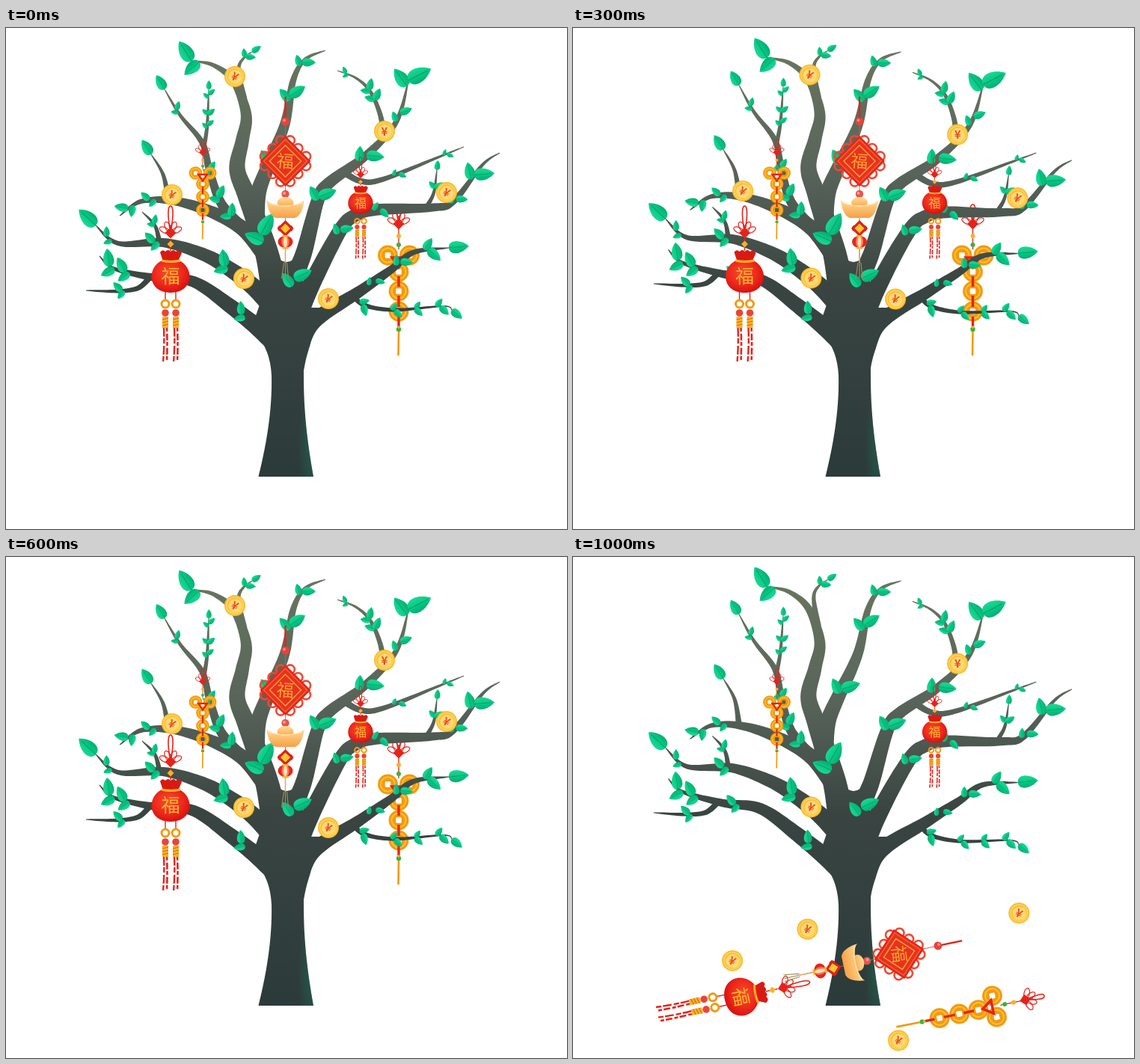
An HTML page that plays this animation: 750x670 px, repeating every 1100 ms.

```html
<!DOCTYPE html>
<html lang="zh">
<head>
<meta charset="utf-8">
<title>Lucky tree</title>
<style>
  html, body { margin: 0; width: 100%; height: 100%; overflow: hidden; background: #fff; }
  svg { display: block; width: 750px; height: 670px; }
  text { font-family: "Noto Sans CJK SC", "Noto Sans CJK", sans-serif; text-anchor: middle; }
</style>
</head>
<body>
<svg viewBox="0 0 750 670">
  <defs>
    <linearGradient id="bark" gradientUnits="userSpaceOnUse" x1="0" y1="20" x2="0" y2="600">
      <stop offset="0" stop-color="#69765f"/>
      <stop offset=".3" stop-color="#58645a"/>
      <stop offset=".55" stop-color="#3a4542"/>
      <stop offset="1" stop-color="#2b3a3a"/>
    </linearGradient>
    <radialGradient id="sheen" gradientUnits="userSpaceOnUse" cx="412" cy="560" r="90"
      gradientTransform="translate(412 0) scale(.25 1) translate(-412 0)">
      <stop offset="0" stop-color="#1e6a52" stop-opacity=".7"/>
      <stop offset="1" stop-color="#1e6a52" stop-opacity="0"/>
    </radialGradient>
    <linearGradient id="leaf" x1="0" y1="0" x2="0" y2="1">
      <stop offset="0" stop-color="#1bd996"/>
      <stop offset=".5" stop-color="#08c985"/>
      <stop offset="1" stop-color="#04ad74"/>
    </linearGradient>
    <radialGradient id="bag" cx=".45" cy=".4" r=".6">
      <stop offset="0" stop-color="#f4502f"/>
      <stop offset=".6" stop-color="#ee2a1c"/>
      <stop offset="1" stop-color="#d8120f"/>
    </radialGradient>
    <linearGradient id="gold" x1="0" y1="0" x2="0" y2="1">
      <stop offset="0" stop-color="#ffdc96"/>
      <stop offset="1" stop-color="#f7a045"/>
    </linearGradient>
  </defs>
  <g id="scene"></g>
</svg>
<script>
const STEP = 100, STEPS = 11, DROP_START = 7, DROP_STEPS = 3;
const RED = '#e5231b', GOLD = '#f9b126', AMBER = '#f29a12';

// The tree shakes upright, left, upright, right, then holds right while things drop.
const swayAt = step => step > DROP_START ? 1 : Math.round(-Math.sin(step * Math.PI / 2));

// Turns a point about the crown's base; the turn grows with distance.
function warp(x, y, sway) {
  const dx = x - 375, dy = y - 375;
  if (dy > 100) return [x, y];
  const angle = (sway < 0 ? -0.052 : 0.034 * sway) * Math.min(1, Math.hypot(dx, dy) / 220);
  return [x - dy * angle, y + dx * angle];
}

const place = (x, y, turn, size, body) =>
  `<g transform="translate(${x.toFixed(1)} ${y.toFixed(1)}) rotate(${turn.toFixed(1)}) scale(${size})">${body}</g>`;
const stroke = (d, color, width, extra = '') =>
  `<path d="${d}" fill="none" stroke="${color}" stroke-width="${width}" ${extra}/>`;
const fill = (d, color) => `<path d="${d}" fill="${color}"/>`;
const disc = (x, y, r, color) => `<circle cx="${x}" cy="${y}" r="${r}" fill="${color}"/>`;
const ring = (x, y, r, color, width) =>
  `<circle cx="${x}" cy="${y}" r="${r}" fill="none" stroke="${color}" stroke-width="${width}"/>`;
const oval = (x, y, rx, ry, color) =>
  `<ellipse cx="${x}" cy="${y}" rx="${rx}" ry="${ry}" fill="${color}"/>`;
const rhomb = (y, r, color) => fill(`M0 ${y - r}L${r} ${y}L0 ${y + r}L${-r} ${y}Z`, color);
const glyph = (char, size, color, weight = 500) =>
  `<text y="${size * 0.37}" font-size="${size}" font-weight="${weight}" fill="${color}">${char}</text>`;

const trunk = `M337.5 600C350 550 356 505 355 465C354 440 346 420 328 402L346 350L338 300H358
  Q366 313 375 313T393 300L398 350L402 374L432 374C408 390 398 420 398 465C398 510 402 550 411 600Z`;
const limbs = [];

const spline = (a, b, c, d, t) =>
  b + t / 2 * (c - a + t * (2 * a - 5 * b + 4 * c - d + t * (3 * (b - c) + d - a)));

// A limb tapers from `width` to its tip, which may end in a leaf of size `tip`.
// Each pair [t, size] sets two leaves where the limb is t of the way along.
function limb(route, width, tip = 0, pairs = []) {
  const knots = route.split(' ').map(p => p.split(',').map(Number));
  const at = i => knots[Math.max(0, Math.min(knots.length - 1, i))];
  const line = [{ x: at(0)[0], y: at(0)[1], run: 0 }];
  for (let i = 0; i < knots.length - 1; i++)
    for (let k = 1; k <= 10; k++) {
      const [x, y] = [0, 1].map(c => spline(at(i - 1)[c], at(i)[c], at(i + 1)[c], at(i + 2)[c], k / 10));
      const prev = line[line.length - 1];
      line.push({ x, y, run: prev.run + Math.hypot(x - prev.x, y - prev.y) });
    }
  const last = line.length - 1, length = line[last].run;
  line.forEach((p, i) => {
    const a = line[Math.max(0, i - 1)], b = line[Math.min(last, i + 1)];
    p.t = p.run / length;
    p.angle = Math.atan2(b.y - a.y, b.x - a.x);
    p.half = (width * (1 - p.t) ** 0.8 + 1) / 2;
  });
  const leaves = tip ? [{ ...line[last], size: tip, lean: 0 }] : [];
  for (const [t, size] of pairs)
    for (const side of [-1, 1]) {
      const spot = line.find(p => p.t >= t - (side < 0 ? 0.025 : 0.001));
      leaves.push({ ...spot, size: side < 0 ? size * 0.85 : size, lean: side * 0.85 });
    }
  limbs.push({ line, leaves });
}

// top left, with its twig
limb('366,400 352,315 336,262 321,222 309,188 316,150 321,115 305,72 278,50 248,44', 38, 0, [[0.31, 32], [1, 31]]);
limb('318,95 311,56 318,40 329,32', 8, 14, [[0.85, 14]]);
// top middle
limb('334,262 337,222 349,188 373,128 384,70 400,42 427,30', 23, 0, [[0.32, 26], [0.68, 24], [0.86, 18]]);
// left, two thin shoots and the coin branch
limb('320,270 288,235 272,190 262,153 233,117 212,82', 14, 22, [[0.12, 18], [0.25, 18], [0.42, 14], [0.85, 12]]);
limb('265,157 269,130 271,82', 5, 12, [[0.32, 11], [0.55, 12], [0.85, 11]]);
limb('345,300 315,267 270,244 222,231 180,232 152,251', 23, 0, [[0.78, 15], [0.92, 19]]);
limb('217,230 210,196 194,169', 7, 23);
// lower left
limb('372,390 335,350 300,323 262,302 210,287 150,288 120,264', 27, 31, [[0.36, 23], [0.7, 18], [0.92, 14]]);
limb('205,286 199,264 182,246', 6, 0, [[0.5, 13]]);
limb('376,480 365,432 345,408 300,372 250,339 200,334 145,322 125,305', 29, 0,
  [[0.36, 18], [0.7, 17], [0.87, 22], [0.94, 24]]);
limb('192,334 176,348 148,352 107,351', 7, 0, [[0.45, 16]]);
// right, upward
limb('374,400 384,340 399,298 417,230 432,207 482,170 522,125 538,70', 27, 0,
  [[0.16, 26], [0.47, 25], [0.68, 24], [0.87, 17], [1, 34]]);
limb('505,143 500,115 487,85 468,67 443,57', 7, 0, [[0.42, 17], [0.55, 16], [0.88, 10]]);
limb('450,192 475,205 505,202 580,172 612,159', 8, 0, [[0.42, 11], [0.85, 10]]);
limb('385,400 405,350 447,270 468,250 495,243 570,240 598,232 637,183 660,167', 26, 0,
  [[0.36, 18], [0.52, 15], [0.78, 16], [0.88, 27]]);
limb('563,238 572,220 576,190', 5, 13, [[0.5, 14]]);
// lower right
limb('380,480 392,430 412,392 470,354 515,323 545,300 592,294', 27, 27, [[0.62, 13], [0.77, 17], [0.9, 22]]);
limb('463,357 480,371 520,377 585,372 596,377', 6, 18, [[0.12, 16], [0.42, 14], [0.62, 14], [0.85, 16]]);

const leafShape = fill('M-.5 0C-.5 -.4 .1 -.4 .5 0C.1 .4 -.5 .4 -.5 0Z', 'url(#leaf)') +
  stroke('M-.5 0L.35 0', '#0aa06c', 0.035);

function limbShape({ line }, sway) {
  const edge = side => line.map(p => {
    const [x, y] = warp(p.x, p.y, sway);
    return `${(x - Math.sin(p.angle) * p.half * side).toFixed(1)} ${(y + Math.cos(p.angle) * p.half * side).toFixed(1)}`;
  });
  return fill(`M${[...edge(1), ...edge(-1).reverse()].join('L')}Z`, 'url(#bark)');
}

function leafAt({ x, y, angle, lean, size }, sway) {
  const [px, py] = warp(x, y, sway), dir = angle + lean;
  return place(px + Math.cos(dir) * size / 2, py + Math.sin(dir) * size / 2, dir * 180 / Math.PI, size, leafShape);
}

const tree = sway => limbs.map(l => limbShape(l, sway)).join('') +
  fill(trunk, 'url(#bark)') + fill(trunk, 'url(#sheen)') +
  limbs.flatMap(l => l.leaves).map(leaf => leafAt(leaf, sway)).join('');

const coin = turn => () => disc(0, 0, 14, '#f8b92c') + disc(0, 0, 12.6, '#ffcf4e') +
  disc(0, 0, 10, '#f5b53a') + disc(0.4, 0.4, 9.3, '#ffd972') +
  `<g transform="rotate(${turn})">${glyph('¥', 15, '#e2502a', 700)}</g>`;

// Loop with a bow knot, from `top` down to a knot at `knot`.
const bow = (top, knot) =>
  stroke(`M0 ${knot}C-3 ${knot - 15} -5 ${top} 0 ${top}S3 ${knot - 15} 0 ${knot}`, RED, 1.6) +
  [-65, -25, 25, 65].map(a => `<ellipse cx="0" cy="-9" rx="3.6" ry="7" fill="none" stroke="${RED}"
    stroke-width="1.2" transform="translate(0 ${knot}) rotate(${a})"/>`).join('') +
  rhomb(knot, 7.5, RED);

const tassel = x => stroke(`M${x} 20V32`, RED, 1.4) + ring(x, 37, 5, AMBER, 3) +
  disc(x, 49, 4.8, '#e8453a') + fill(`M${x - 4} 54h8v15h-8Z`, GOLD) +
  stroke(`M${x - 4} 58l8 -2m-8 6l8 -2m-8 6l8 -2`, '#d96a10', 1.2) +
  stroke(`M${x - 2} 69Q${x - 1} 90 ${x - 3} 115`, RED, 2.4, 'stroke-dasharray="12 2 7 3"') +
  stroke(`M${x + 2} 69Q${x + 3} 90 ${x + 2} 115`, RED, 2.6, 'stroke-dasharray="5 3 9 2"');

const lantern = bend => bow(-94, -58) + stroke('M0 -50V-34', RED, 1.5) + rhomb(-43, 4.5, GOLD) +
  `<g transform="rotate(${bend} 0 25)">${tassel(-7)}${tassel(7)}</g>` +
  fill('M-14 -32Q-11 -37 -7 -33Q-3 -37 0 -33Q4 -37 7 -33Q12 -37 15 -31L10 -20H-10Z', '#d91a14') +
  fill('M-10 -22C-33 -12 -31 22 0 22S33 -12 10 -22Z', 'url(#bag)') +
  stroke('M-12 -21Q0 -18 13 -21', GOLD, 3) + glyph('福', 25, '#f7b32b');

const cash = (x, y) => ring(x, y, 9.2, AMBER, 8.4) + ring(x, y, 9.5, '#ffc02c', 2) +
  `<rect x="${x - 4.5}" y="${y - 4.5}" width="9" height="9" fill="none" stroke="${AMBER}" stroke-width="1.5"/>`;

const cashString = bend => bow(-68, -42) + stroke('M0 -36V-8', RED, 1.3) +
  disc(0, -26, 3, GOLD) + disc(0, -14, 3, '#35b53c') +
  `<g transform="rotate(${bend} 0 -8)">` +
  cash(-14.5, 0) + cash(14.5, 0) + [22, 48, 75].map(y => cash(0, y)).join('') +
  stroke('M-9 3H9L0 16Z', RED, 3.4) + stroke('M0 28V42M0 54V69M0 82V96', RED, 3.4) +
  disc(0, 99, 3.2, '#35b53c') + disc(0, 96, 1.8, GOLD) +
  stroke('M0 102L-.5 134', AMBER, 2.6) + '</g>';

const loops = [45, 135, 225, 315].map(a => `<g transform="rotate(${a})">` +
  [-15, 0, 15].map(x => ring(x, -24, 6, '#ee4a32', 2.6)).join('') + '</g>').join('');

const charm = () => stroke('M0 -86V130', '#d9583a', 0.9) + stroke('M0 -86V-58', RED, 2.4) +
  disc(0, -53, 5.5, '#e4443c') + disc(-1.5, -54.5, 2, '#f08a7c') + loops +
  rhomb(0, 34, '#e5261c') + rhomb(0, 30, '#f4662c') + rhomb(0, 28, '#e8311f') +
  stroke('M0 -21L21 0L0 21L-21 0Z', '#f39a35', 1.6) +
  `<g transform="rotate(5)">${glyph('福', 23, '#f5a52f')}</g>` +
  disc(0, 44, 5.2, '#e8544a') + disc(-1.5, 43, 2, '#f39c8e') +
  oval(0, 56, 11, 8, 'url(#gold)') +
  fill('M-25 52Q-20 59 0 59T25 52Q23 72 13 76H-13Q-23 72 -25 52Z', 'url(#gold)') +
  stroke('M-23 56Q0 64 23 56', '#ffe3ac', 1.3) +
  ring(-6, 90, 3.5, RED, 1.6) + ring(6, 90, 3.5, RED, 1.6) + rhomb(90, 11, '#dd211b') + rhomb(90, 6.5, '#ffc62e') +
  oval(0, 108, 10, 8, '#e5261c') + oval(0, 108, 5, 8, '#ff7f50') + oval(0, 108, 2.4, 7.5, '#ffe3b8') +
  fill('M-4 99h8v2.5h-8ZM-4 115h8v2.5h-8Z', GOLD) + stroke('M0 118V136', '#e2a76a', 1.6) +
  stroke('M-2 136L-5 157M0 136V157M2 136L4 157', '#a08a52', 1.2);

// drop: total shift in x and y, and the easing power
const backString = { x: 525, y: 304, draw: cashString, drop: [29, 297, 0.68] };
const ornaments = [
  { x: 263, y: 194, size: 0.66, draw: cashString },
  { x: 474, y: 234, size: 0.655, draw: lantern },
  { x: 220, y: 332, draw: lantern, drop: [-5, 256, 0.9] },
  { x: 373.5, y: 178, draw: charm, drop: [53, 353, 1.8] }
];
const coins = [
  { x: 306, y: 65, draw: coin(28), drop: [-3, 435, 2.2] },
  { x: 506, y: 138, draw: coin(0) },
  { x: 589, y: 220, draw: coin(28), drop: [2, 249, 0.88] },
  { x: 222, y: 223, draw: coin(28), drop: [-14, 322, 2.3] },
  { x: 318, y: 335, draw: coin(28) },
  { x: 431, y: 362, draw: coin(28), drop: [4, 284, 1.15] }
];

function hang({ size = 1, draw, drop }, [x, y], step, swings) {
  if (!drop || step <= DROP_START) return place(x, y, 0, size, draw(0));
  const [dx, dy, ease] = drop;
  const part = (step - DROP_START) / DROP_STEPS, fallen = part ** ease;
  const turn = swings ? 78 * part ** 3.36 : 0;
  const bend = 28 * Math.sin(part * Math.PI);
  return place(x + dx * fallen ** ease, y + dy * fallen, turn, size, draw(bend));
}

const trees = { '-1': tree(-1), 0: tree(0), 1: tree(1) };
const scene = document.getElementById('scene');
let shown = -1;

function render(time) {
  const step = Math.floor(time / STEP) % STEPS;
  if (step === shown) return;
  shown = step;
  const sway = swayAt(step);
  const swing = o => hang(o, [o.x + 9.5 * sway, o.y], step, true);
  scene.innerHTML = swing(backString) + trees[sway] + ornaments.map(swing).join('') +
    coins.map(c => hang(c, warp(c.x, c.y, sway), step, false)).join('');
}

const start = performance.now();
function tick() {
  render(performance.now() - start);
  requestAnimationFrame(tick);
}
tick();
</script>
</body>
</html>
```
